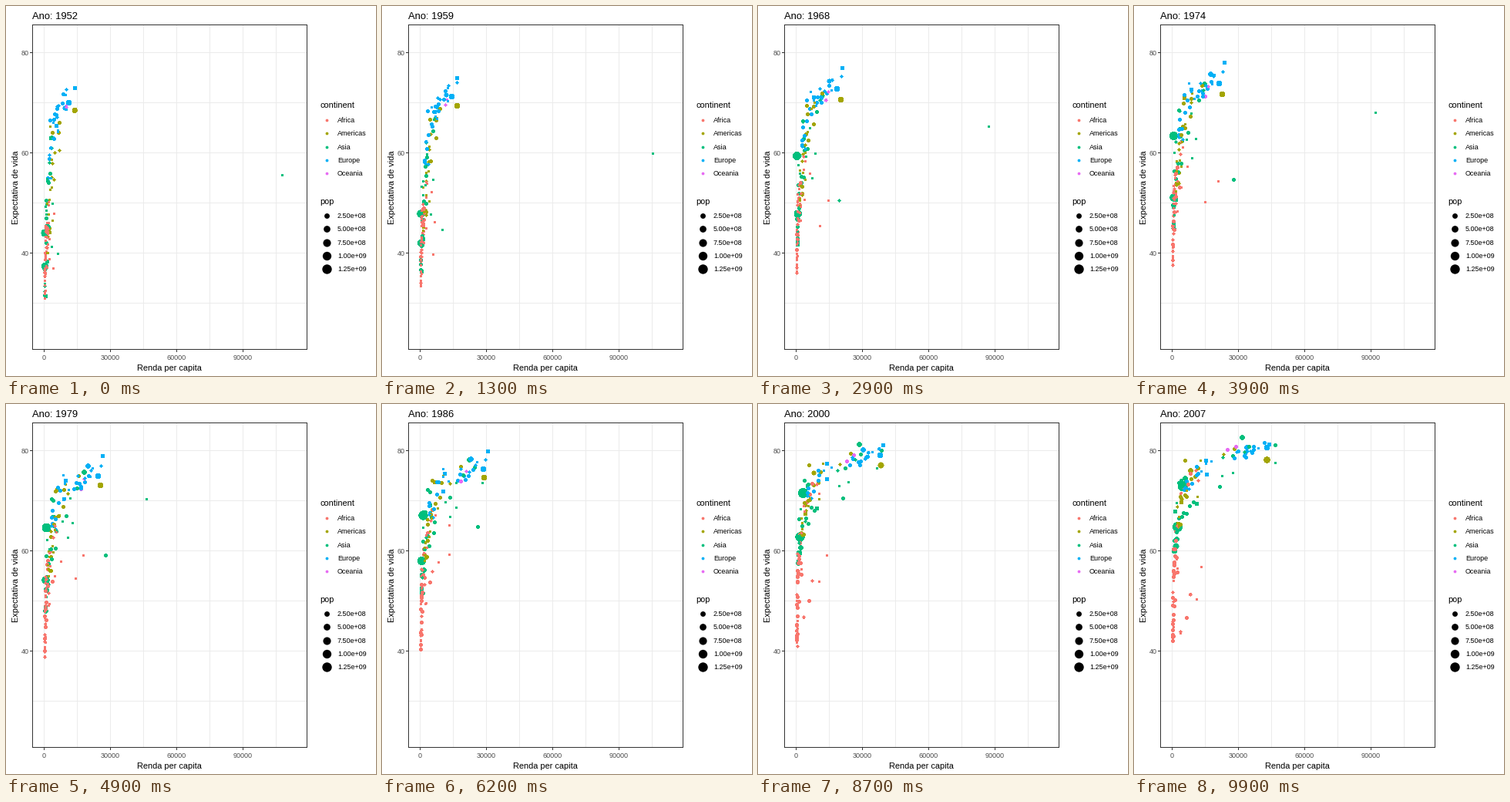
Write a matplotlib script that moves like this. It is 480 px wide and 480 px high and loops after 10000 ms.

```python
import numpy as np
import matplotlib.pyplot as plt
from matplotlib.animation import FuncAnimation

FRAMES, INTERVAL = 100, 100
AFRICA, AMERICAS, ASIA, EUROPE, OCEANIA = (
    "#F8766D", "#A3A500", "#00BF7D", "#00B0F6", "#E76BF3")
CONTINENTS = {"Africa": AFRICA, "Americas": AMERICAS, "Asia": ASIA,
              "Europe": EUROPE, "Oceania": OCEANIA}
GRID, DARK, GREY = "#EBEBEB", "#333333", "#4D4D4D"

rng = np.random.default_rng(7)
progress = np.linspace(0, 1, FRAMES)
dots = []  # colour, x, y, population, each traced over the whole loop


def px(income):
    """Income in thousands to stage pixels."""
    return 49.2 + income * 86 / 30


def py(life):
    return 320.5 - (life - 40) * 6.5


def area(millions):
    """Marker area in square points for a population."""
    size = 1 + 5 * np.sqrt(np.clip(millions / 1319, 0, 1))
    return ((2.05 * size + 0.35) * 0.72) ** 2


def add(color, pop, income, life):
    people = pop[0] * (pop[1] / pop[0]) ** progress
    dots.append((color, px(income), py(life), people))


def mover(color, pop, income, life):
    """A country that leaves the crowd, on evenly timed key points."""
    paths = (np.interp(progress, np.linspace(0, 1, len(knots)), knots)
             for knots in (income, life))
    add(color, pop, *paths)


def crowd(color, n, pop, growth, income, life, bulge):
    """Countries spread from a start range to an end range.

    Income follows a square-root ramp; life expectancy rises by `bulge`
    above a straight line halfway through.
    """
    for rank in (np.arange(n) + 0.5) / n:
        u = np.clip(rank + rng.normal(0, 0.15, 4), 0, 1)
        a, b = (lo * (hi / lo) ** k for (lo, hi), k in zip(income, u))
        c, d = (lo + (hi - lo) * k for (lo, hi), k in zip(life, u[2:]))
        root = np.sqrt(a) + (np.sqrt(b) - np.sqrt(a)) * progress
        arc = 4 * progress * (1 - progress) * (bulge + rng.normal(0, 1))
        start = pop * rng.lognormal(0, 1.1)
        add(color, (start, start * growth), root ** 2,
            c + (d - c) * progress + arc)


mover(ASIA, (556, 1319), [.4, .5, .75, 1.3, 2.2, 5],
      [44, 50.5, 44.5, 58.4, 63.1, 64, 65.5, 67.3, 68.7, 70.4, 72, 73])
mover(ASIA, (372, 1110), [.55, .72, .98, 2.45], [37.4, 49.2, 59.3, 64.7])
mover(ASIA, (86, 127), [3.2, 13, 23.6, 31.7], [63, 72.6, 78.9, 82.6])
mover(ASIA, (.16, 2.5),
      [108, 114, 95, 81, 109, 59, 31, 28, 35, 40, 35, 47],
      [55.6, 66.5, 74.5, 77.6])
mover(ASIA, (4, 27.6), [6.5, 12, 28.6, 27, 21, 21.7], [39.9, 52, 66.5, 72.8])
mover(AMERICAS, (158, 301), [14, 21.1, 30.3, 43], [68.4, 71, 75.2, 78.2])
mover(AFRICA, (1, 6), [2.4, 9.2, 21.4, 14, 9.5, 12], [42.7, 51.5, 67, 74])
mover(AFRICA, (.4, 1.5), [4.3, 7, 15.5, 13.2, 14.5, 13.2],
      [37, 41, 50.4, 59, 60.7, 56.7])
mover(AFRICA, (2.5, 8.9), [.5, .86],
      [40, 41.5, 43, 44, 44.6, 45, 46, 44, 23.6, 36, 43.4, 46.2])

crowd(AFRICA, 39, 3, 4, [(.3, 1.9), (.3, 2.6)], [(31, 46), (42, 65)], 3)
crowd(AFRICA, 6, 3, 3, [(1, 3), (4, 11)], [(42, 52), (71, 76)], 2)
crowd(AFRICA, 5, 1, 3, [(.9, 4.7), (4, 12.5)], [(31, 49), (40, 52)], 9)
crowd(ASIA, 21, 10, 3, [(.4, 3), (1, 11.5)], [(31, 58), (60, 74.5)], 3)
crowd(ASIA, 5, 4, 3, [(1, 4.1), (23, 47)], [(48, 65), (78.5, 82)], 2.5)
crowd(ASIA, 2, .5, 5, [(1.8, 9.9), (22, 30)], [(38, 51), (75, 76)], 4)
crowd(AMERICAS, 22, 5, 3, [(1.4, 7), (2.6, 13)], [(40, 64), (65, 79)], 2)
crowd(AMERICAS, 2, 6, 2, [(3, 11), (19, 36)], [(64, 69), (78.5, 81)], 1)
crowd(EUROPE, 16, 10, 1.25, [(4.5, 14), (28, 44)], [(65.5, 73), (78.5, 81.5)], 0)
crowd(EUROPE, 14, 9, 1.25, [(1.5, 6.5), (5.5, 22)], [(55, 67), (71.5, 78)], 2)
crowd(OCEANIA, 2, 4, 2.2, [(10, 10.6), (25, 34.4)], [(69, 69.4), (80, 81)], -1)

# Small countries are drawn over large ones, on whole pixels
dots.sort(key=lambda d: -d[3][-1])
colors = [d[0] for d in dots]
offsets = np.floor([d[1:3] for d in dots]).transpose(2, 0, 1) + 0.5
areas = area(np.array([d[3] for d in dots]).T)

plt.rcParams["font.family"] = "Liberation Sans"
fig = plt.figure(figsize=(4.8, 4.8), dpi=100, facecolor="white")
ax = fig.add_axes([0, 0, 1, 1])
ax.set(xlim=(0, 480), ylim=(480, 0))
ax.axis("off")


def line(xs, ys, color, z=1):
    """Hard one-pixel line; the offset keeps snapping on the given pixel."""
    ax.plot(np.add(xs, 0.2), np.add(ys, 0.2), color=color, lw=0.72,
            antialiased=False, zorder=z, solid_capstyle="butt")


def label(x, y, text, size, color="black", **kw):
    return ax.text(x, y, text, fontsize=size * 0.72, color=color,
                   va="baseline", **kw)


def marks(xy, sizes, color):
    return ax.scatter(xy[:, 0], xy[:, 1], s=sizes, c=color, linewidths=0,
                      antialiased=False, zorder=3)


left, right, top, bottom = 34, 390, 24, 445
for income in range(0, 106, 15):
    x = int(px(income))
    line([x, x], [top, bottom], GRID)
    if income % 30 == 0:
        line([x, x], [bottom, bottom + 3], DARK)
        label(x, 459, str(income * 1000), 9, GREY, ha="center")
for life in range(30, 81, 10):
    y = int(py(life))
    line([left, right], [y, y], GRID)
    if life % 20 == 0:
        line([left - 3, left], [y, y], DARK)
        label(29.5, y + 4.5, str(life), 9, GREY, ha="right")
line([left, right, right, left, left], [top, top, bottom, bottom, top], DARK, 5)

title = label(34, 17, "", 13)
label(212, 473, "Renda per capita", 11, ha="center")
label(16, 235.5, "Expectativa de vida", 11, ha="center", rotation=90,
      rotation_mode="anchor")

label(407, 132, "continent", 11)
label(407, 257, "pop", 11)
for k, (name, color) in enumerate(CONTINENTS.items()):
    dy = round(17.28 * k)
    label(430, 151 + dy, name, 9)
    marks(np.array([[415.5, 147.5 + dy]]), (3.8 * 0.72) ** 2, [color])
    pop = 250 * (k + 1)
    label(430, 275 + dy, f"{pop * 1e6:.2e}", 9)
    marks(np.array([[415.5, 271.5 + dy]]), area(pop), ["black"])

cloud = marks(offsets[0], areas[0], colors)


def update(i):
    cloud.set_offsets(offsets[i])
    cloud.set_sizes(areas[i])
    title.set_text(f"Ano: {int(1952 + 55 * progress[i] + 0.5)}")
    return cloud, title


anim = FuncAnimation(fig, update, frames=FRAMES, interval=INTERVAL,
                     repeat=True, repeat_delay=0)
plt.show()
```
